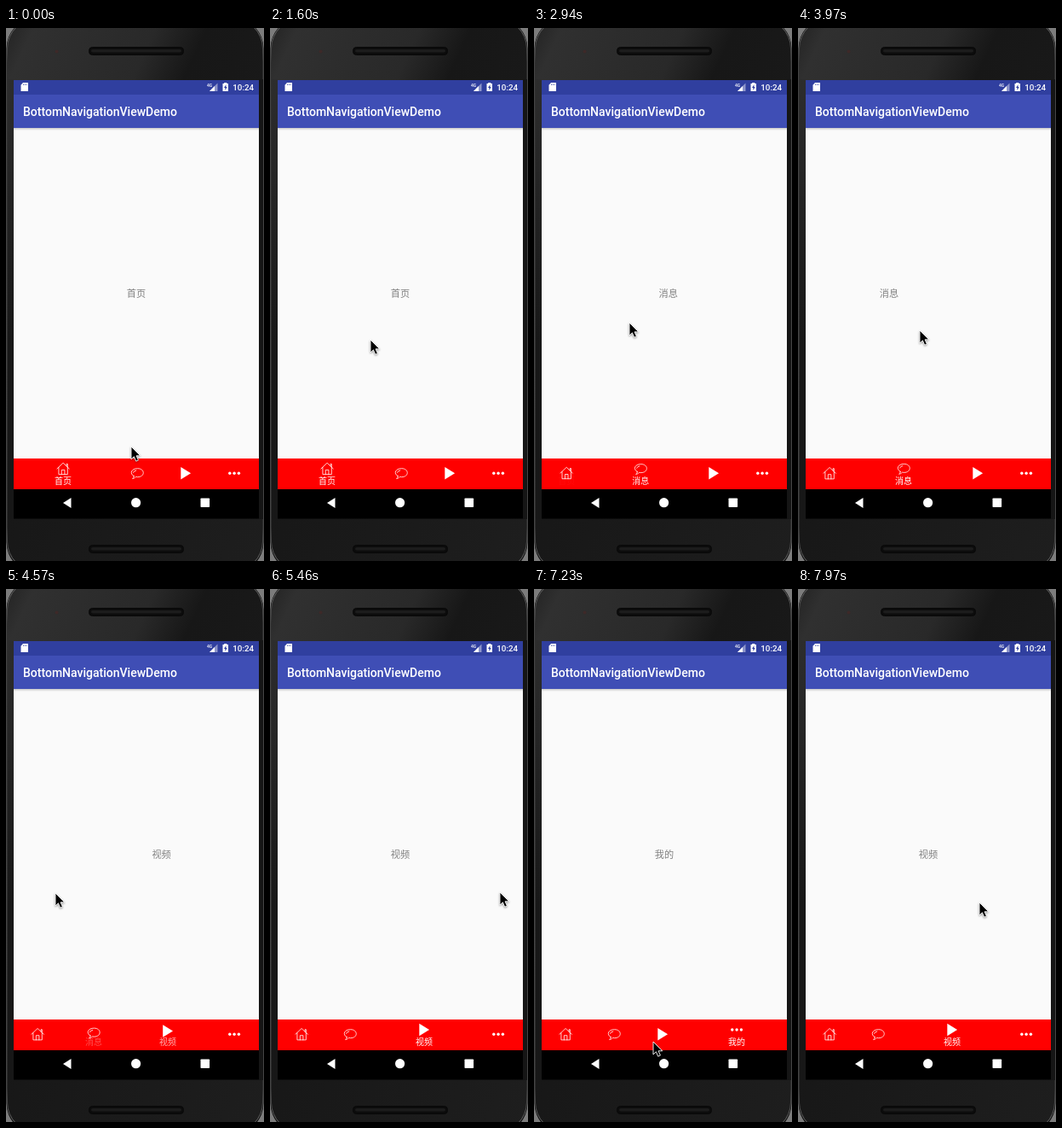
An HTML page for the animation above (8000 ms loop, 303 by 624 pixels).

```html
<!DOCTYPE html>
<html lang="zh">
<head>
<meta charset="utf-8">
<title>Bottom navigation</title>
<style>
html, body { margin: 0; width: 100%; height: 100%; overflow: hidden; background: #111; }
svg { display: block; width: 303px; height: 624px; }
.latin { font-family: Roboto, sans-serif; font-weight: 500; fill: #fff; }
.cjk { font-family: "Noto Sans CJK SC", "Noto Sans CJK", sans-serif; text-anchor: middle; }
.line { fill: none; stroke: #fff; stroke-width: .8; stroke-linejoin: round; stroke-linecap: round; }
#cursor { filter: drop-shadow(.5px 1px .8px #0006); }
</style>
</head>
<body>
<svg viewBox="0 0 303 624">
  <defs>
    <linearGradient id="body" x2="1" y2="1">
      <stop offset="0" stop-color="#222"/>
      <stop offset=".06" stop-color="#303030"/>
      <stop offset=".3" stop-color="#292929"/>
      <stop offset=".4" stop-color="#171717"/>
      <stop offset="1" stop-color="#1e1e1e"/>
    </linearGradient>
    <linearGradient id="rim" x2="0" y2="1">
      <stop offset="0" stop-color="#999"/>
      <stop offset=".08" stop-color="#333"/>
      <stop offset=".92" stop-color="#333"/>
      <stop offset="1" stop-color="#999"/>
    </linearGradient>
    <linearGradient id="side" x2="0" y2="1">
      <stop offset="0" stop-color="#2d2d2d"/>
      <stop offset=".6" stop-color="#171717"/>
    </linearGradient>
    <linearGradient id="shade" x2="0" y2="1">
      <stop offset="0" stop-color="#000" stop-opacity=".2"/>
      <stop offset="1" stop-color="#000" stop-opacity="0"/>
    </linearGradient>
    <clipPath id="screen"><rect x="9" y="117" width="288" height="387"/></clipPath>
    <g id="speaker">
      <rect x="97.5" y="-4.5" width="111" height="9" rx="4" fill="#0c0c0c" stroke="#080808"/>
      <rect x="100" y="-2" width="106" height="3.5" rx="1.7" fill="#1c1c1c"/>
    </g>
  </defs>

  <rect width="303" height="624" fill="#7c7c7c"/>
  <rect x=".5" y="-12" width="302" height="650" rx="36" fill="#0d0d0d"/>
  <rect x="1.5" y="-11" width="300" height="647" rx="35" fill="url(#body)" stroke="url(#rim)" stroke-width=".8"/>
  <rect x="2" y="60" width="7" height="515" fill="url(#side)"/>
  <rect x="297" y="60" width="5" height="515" fill="#151515"/>
  <use href="#speaker" y="27"/>
  <use href="#speaker" y="610"/>
  <circle cx="59.5" cy="27.5" r="2" fill="#3d2928"/>

  <rect x="9" y="61" width="288" height="17" fill="#303f9f"/>
  <rect x="9" y="78" width="288" height="39" fill="#3f4eb5"/>
  <rect x="9" y="117" width="288" height="387" fill="#fafafa"/>
  <rect x="9" y="117" width="288" height="3" fill="url(#shade)"/>
  <text class="latin" x="20" y="102.5" font-size="14">BottomNavigationViewDemo</text>

  <path d="M20 64H26V74H17.5V66.7Z" fill="#fff"/>
  <path d="M20.5 65.5V67M22.3 65.5V67M24.1 65.5V67" stroke="#303f9f" stroke-width=".7"/>
  <text class="latin" x="236" y="69" font-size="5">4G</text>
  <path d="M248.5 64.5V74H239Z" fill="#fff" opacity=".45"/>
  <path d="M245 68V74H239Z" fill="#fff"/>
  <path d="M256.2 64H259.3V65H261V74H254.5V65H256.2Z" fill="#fff"/>
  <path d="M258.4 66.2L256 70H257.4V73L259.7 69H258.4Z" fill="#303f9f"/>
  <text class="latin" x="266.3" y="73.2" font-size="9.8">10:24</text>

  <g clip-path="url(#screen)"><g id="pages"></g></g>

  <rect x="9" y="504" width="288" height="36" fill="#f00"/>
  <g id="tabs"></g>
  <rect x="9" y="540" width="288" height="34.5" fill="#000"/>
  <path d="M67 556L76.5 550V562Z" fill="#fff"/>
  <circle cx="152.6" cy="555.7" r="5.6" fill="#fff"/>
  <rect x="228.5" y="550.5" width="10.6" height="10.6" rx=".8" fill="#fff"/>

  <path id="cursor" d="M0 0V15L3.4 11.8L5.7 17.2L8.4 16L6.1 10.8H10.8Z" fill="#000" stroke="#fff" stroke-width=".9"/>
</svg>
<script>
const LOOP = 8000, PAGE = 288, LEFT = 9, SLIM = 57, WIDE = 117;
const SETTLE = 3, TAP = 51;
const names = ["首页", "消息", "视频", "我的"];
const icons = [
  `<path class="line" d="M-7.2 0L0 -6.8L7.2 0M-5.2 -1.5V6.6H5.2V-1.5M-1.8 6.6V1.4H1.8V6.6M4 -3.2V-5.6H5.2V-2"/>`,
  `<path class="line" d="M-4 3.3C-9.6 .2 -6.6 -5.6 .4 -5.6C9.4 -5.6 9.4 4.4 .4 4.4L-1.7 4.2C-2.8 5.4 -4 6.1 -5.5 6.3C-4.4 5.3 -4 4.6 -4 3.3ZM-4.6 -.9Q-3.8 -3 -1.3 -3.4"/>`,
  `<path fill="#fff" d="M-5.8 -7.3L6 0L-5.8 7.3Z"/>`,
  [-5.3, 0, 5.3].map(x => `<circle cx="${x}" r="1.7" fill="#fff"/>`).join("")
];

// Pointer waypoints: step, x, y.
const route = [
  [0, 147, 490], [8, 213, 367], [11, 118, 365], [14, 220, 364], [16, 155, 355], [18, 61, 346],
  [20, 112, 345], [23, 120, 347], [25, 189, 352], [27, 143, 354], [30, 1, 356],
  [35, 286, 356], [37, 270, 355], [41, 1, 362], [44, 188, 482], [46, 213, 520],
  [49, 140, 530], [54, 123, 524]
];
const swipes = [{ press: 14, release: 18 }, { press: 25, release: 30 }, { press: 37, release: 41 }];

const clamp = (v, lo, hi) => Math.min(hi, Math.max(lo, v));
const mix = (a, b, u) => a + (b - a) * u;
const settle = steps => 1 - (1 - clamp(steps / SETTLE, 0, 1)) ** 3;

function pointer(n) {
  const i = clamp(route.findIndex(p => p[0] > n), 1, route.length - 1);
  const [a, b] = [route[i - 1], route[i]];
  const u = clamp((n - a[0]) / (b[0] - a[0]), 0, 1);
  return { x: mix(a[1], b[1], u), y: mix(a[2], b[2], u) };
}

// Each swipe follows the pointer, then glides on to the next page.
function view(n) {
  if (n > TAP) return { scroll: 2 * PAGE, tab: 3 - settle(n - TAP) };
  let scroll = 0, tab = 0;
  for (const { press, release } of swipes) {
    if (n < press) break;
    const drag = pointer(press).x - pointer(Math.min(n, release)).x;
    const glide = settle(n - release);
    scroll += mix(drag, PAGE, glide);
    tab += glide;
  }
  return { scroll, tab };
}

function stepAt(t) {
  const a = .0495, b = 144.9;
  return Math.floor((Math.sqrt(b * b + 4 * a * t) - b) / (2 * a) + 1e-6);
}

const $ = id => document.getElementById(id);
const pages = $("pages"), tabs = $("tabs"), cursor = $("cursor");
pages.innerHTML = names.map((s, i) =>
  `<text class="cjk" x="${LEFT + PAGE * (i + .5)}" y="314.7" font-size="11.2" fill="#808080">${s}</text>`).join("");
tabs.innerHTML = names.map(s =>
  `<g><g></g><text class="cjk" y="534.4" font-size="10" fill="#fff">${s}</text></g>`).join("");
[...tabs.children].forEach((item, i) => item.firstChild.innerHTML = icons[i]);

const move = (el, x, y) => el.setAttribute("transform", `translate(${x} ${y})`);

function draw(t) {
  const n = stepAt(t), { x, y } = pointer(n), { scroll, tab } = view(n);
  move(cursor, x, y);
  move(pages, -scroll, 0);
  let left = LEFT - .4;
  [...tabs.children].forEach((item, i) => {
    const on = Math.max(0, 1 - Math.abs(tab - i));
    const width = mix(SLIM, WIDE, on);
    move(item, left + width / 2, 0);
    move(item.firstChild, 0, mix(521.3, 516, on));
    item.lastChild.setAttribute("opacity", on);
    left += width;
  });
}

function tick() {
  draw(performance.now() % LOOP);
  requestAnimationFrame(tick);
}
tick();
</script>
</body>
</html>
```
